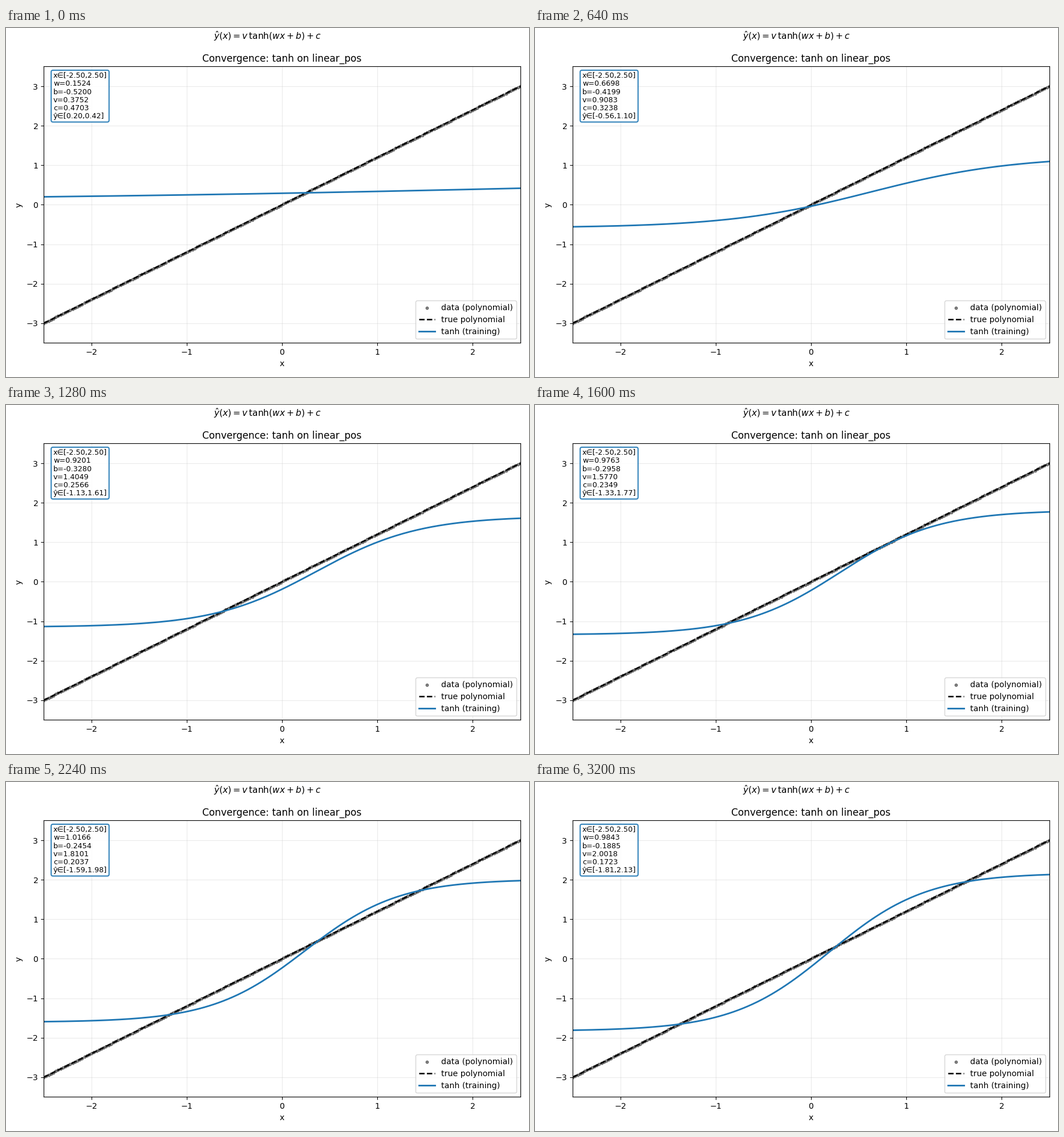
Animation of 917x611 px, one loop 3.28 s. Source, as a matplotlib script:

```python
import numpy as np
import matplotlib.pyplot as plt
from matplotlib.animation import FuncAnimation
from matplotlib.patches import FancyBboxPatch

W, H, DPI = 917, 611, 101.85
FRAMES, INTERVAL = 41, 80
RATE, SUBSTEPS = 0.05, 20      # learning rate per frame, split into substeps
START = (0.1524, -0.5200, 0.3752, 0.4703)   # w, b, v, c
BLUE = "#1f77b4"

plt.rcParams["font.family"] = "DejaVu Sans"

x = np.linspace(-2.5, 2.5, 200)
target = 1.2 * x


def model(p):
    w, b, v, c = p
    return v * np.tanh(w * x + b) + c


def gradient(p):
    """Gradient of the mean squared error."""
    w, b, v, c = p
    t = np.tanh(w * x + b)
    r = v * t + c - target
    s = r * v * (1 - t * t)
    return 2 * np.array([np.mean(s * x), np.mean(s), np.mean(r * t), np.mean(r)])


def train():
    """Parameters at every frame of gradient descent."""
    p = np.array(START)
    path = [p]
    for _ in range(FRAMES - 1):
        for _ in range(SUBSTEPS):
            p = p - RATE / SUBSTEPS * gradient(p)
        path.append(p)
    return path


path = train()

fig = plt.figure(figsize=((W + 0.001) / DPI, (H + 0.001) / DPI), dpi=DPI,
                 facecolor="white")
left, right, top, bottom = 66.3, 901.7, 67.48, 551.45
ax = fig.add_axes([left / W, 1 - bottom / H, (right - left) / W, (bottom - top) / H])
fig.suptitle(r"$\hat{y}(x) = v\,\tanh(wx+b)+c$", fontsize=11, y=0.995)
ax.set_title("Convergence: tanh on linear_pos")
ax.set(xlim=(-2.5, 2.5), ylim=(-3.5, 3.5), xlabel="x", ylabel="y",
       xticks=range(-2, 3), yticks=range(-3, 4))
ax.grid(alpha=0.25)

ax.scatter(x, target, s=10, color="black", alpha=0.45, label="data (polynomial)")
ax.plot(x, target, "k--", lw=1.8, label="true polynomial")
curve, = ax.plot(x, model(START), color=BLUE, lw=2, label="tanh (training)")
ax.legend(loc="lower right")

# Parameter box, laid out in pixels from the top left
box = FancyBboxPatch((82.4, H - 161.4), 95.1, 84.3,
                     boxstyle="round,pad=3.2,rounding_size=3.2",
                     transform=None, fc="white", ec=BLUE, lw=1.5, alpha=0.9,
                     zorder=3)
fig.add_artist(box)
lines = [fig.text(83 / W, 1 - (87.3 + 14.15 * i) / H, "", fontsize=9,
                  va="baseline", zorder=4) for i in range(6)]


def update(i):
    p = path[i]
    y = model(p)
    curve.set_ydata(y)
    rows = ["x∈[-2.50,2.50]"]
    rows += [f"{name}={value:.4f}" for name, value in zip("wbvc", p)]
    rows.append(f"ŷ∈[{y.min():.2f},{y.max():.2f}]")
    for line, row in zip(lines, rows):
        line.set_text(row)
    return [curve, *lines]


anim = FuncAnimation(fig, update, frames=FRAMES, interval=INTERVAL,
                     repeat=True, repeat_delay=0, blit=False)
plt.show()
```
